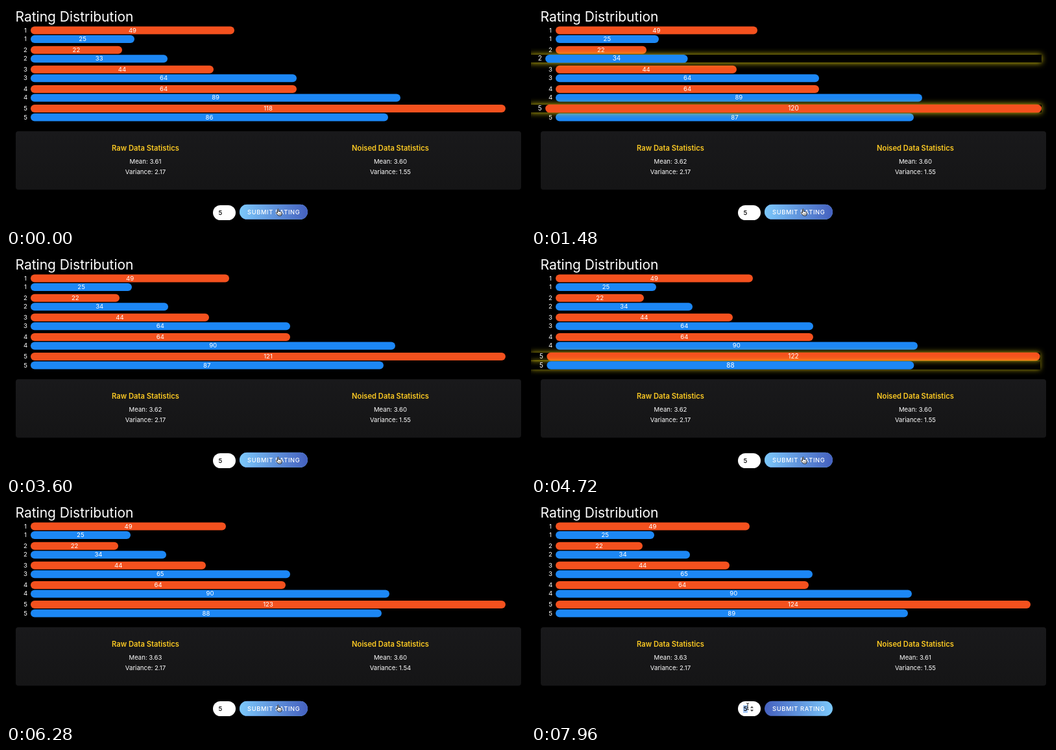
An HTML page that plays this animation: 800 by 339 pixels, repeating every 8000 ms.

```html
<!DOCTYPE html>
<html lang="en">
<head>
<meta charset="utf-8">
<title>Rating Distribution</title>
<style>
  html, body { margin: 0; width: 100%; height: 100%; overflow: hidden; background: #000; }
  body { position: relative; color: #fff; font: 9.6px/12px Inter, "Noto Sans", sans-serif; }
  body * { position: absolute; box-sizing: border-box; white-space: nowrap; }
  h1 { left: 14.5px; top: 3px; margin: 0; font-size: 21px; font-weight: 400; line-height: 27px; }
  .row { left: 14px; top: 0; width: 756px; height: 12px; }
  .row span { left: 10px; width: 12px; text-align: center; }
  .bar { left: 24px; height: 12px; border-radius: 6px; text-align: center; }
  .raw { background: #f4511e; }
  .noised { background: #1c87f5; }
  #panel { left: 14.5px; top: 193px; width: 779px; height: 90px; border-radius: 4px;
           background: linear-gradient(#19191b, #151516); }
  .stats { top: 0; width: 200px; text-align: center; }
  .stats * { width: 100%; left: 0; }
  .stats b { top: 19.5px; color: #fdca23; font-size: 11.2px; font-weight: 600; }
  .mean { top: 40.5px; }
  .variance { top: 57px; }
  #field { left: 319px; top: 307px; width: 35px; height: 23px; border-radius: 12px; background: #fff; color: #000; font-weight: 500; }
  #digit { left: 8px; top: 5.5px; padding: 0 .5px; }
  #button { left: 360px; top: 307px; width: 105px; height: 23px; border-radius: 12px; overflow: hidden;
            background: linear-gradient(90deg, #4561bf, #7cc8fb); }
  #hover { inset: 0; background: linear-gradient(90deg, #7cc8fb, #4561bf); }
  #caption { left: 12px; top: 5.5px; font-size: 9.3px; font-weight: 500; letter-spacing: .65px; }
  svg { left: 0; top: 0; overflow: visible; }
</style>
</head>
<body>
<h1>Rating Distribution</h1>
<div id="chart"></div>
<div id="panel">
  <div class="stats" style="left:100.5px"><b>Raw Data Statistics</b><div class="mean"></div><div class="variance"></div></div>
  <div class="stats" style="left:478px"><b>Noised Data Statistics</b><div class="mean"></div><div class="variance"></div></div>
</div>
<div id="field">
  <span id="digit">5</span>
  <svg id="spinner" width="1" height="1"><path d="M19 10.6l2.5-3 2.5 3zM19 13l2.5 3 2.5-3z" fill="#444"/></svg>
</div>
<div id="button"><div id="hover"></div><span id="caption">SUBMIT RATING</span></div>
<svg id="hand" width="1" height="1">
  <path d="M-2.4-4.6Q-1.6-5.8-.8-4.6V-1.2Q.2-2 1-.9Q2-1.5 2.6-.4Q3.9-.8 4 .6V2.6Q3.8 3.8 3.1 5H-1.2L-4.6 1.2Q-4.9-.2-3.6 0L-2.4 1Z"
        fill="#fff" stroke="#111" stroke-width=".9"/>
  <path d="M-.4 1.6V3.6M1 1.6V3.6M2.4 1.6V3.6" stroke="#111" stroke-width=".6"/>
</svg>
<svg id="beam" width="1" height="1">
  <path d="M-2-5Q0-5 0-3.8Q0-5 2-5M0-3.8V3.8M-2 5Q0 5 0 3.8Q0 5 2 5M-1 1.5H1" fill="none" stroke="#222"/>
</svg>

<script>
const LOOP = 8000, FULL_WIDTH = 756, BAR_LIMIT = 732;
const WIDTH_TIME = 400, PRESS_LEAD = 200, PRESS_TIME = 120;
const LEAVE = 7450, ARRIVE = 7720, SELECT = 7820;

// Every submission adds a raw 5 and one randomly shifted rating.
const submissions = [[220, 5], [1380, 2], [3020, 4], [4340, 5], [5380, 3], [6380, 5]]
  .map(([time, noised]) => ({ time, noised }));
const states = [{ raw: [49, 22, 44, 64, 118], noised: [25, 33, 64, 89, 86] }];
for (const { noised } of submissions) {
  const last = states.at(-1);
  const add = (counts, rating) => counts.map((n, i) => n + (i === rating - 1));
  states.push({ raw: add(last.raw, 5), noised: add(last.noised, noised) });
}

const $ = id => document.getElementById(id);
const clamp = x => Math.min(1, Math.max(0, x));
const mix = (a, b, p) => a + (b - a) * p;
const smooth = x => { x = clamp(x); return x * x * (3 - 2 * x); };
const easeOut = x => 1 - (1 - clamp(x)) ** 3;
const pulse = age => easeOut(age / 190) * (1 - smooth((age - 300) / 260));

const rows = [];
for (let i = 0; i < 5; i++) {
  ['raw', 'noised'].forEach((kind, k) => {
    const row = document.createElement('div');
    row.className = 'row';
    row.innerHTML = `<span>${i + 1}</span><div class="bar ${kind}"></div>`;
    $('chart').append(row);
    rows.push({ row, bar: row.lastChild, kind, i, y: 31.6 + 30.1 * i + 13.5 * k });
  });
}

const barWidth = (state, kind, i) =>
  Math.min(BAR_LIMIT, FULL_WIDTH * state[kind][i] / Math.max(...state.raw, ...state.noised));

function showStats(element, counts) {
  const total = counts.reduce((sum, n) => sum + n, 0);
  const mean = counts.reduce((sum, n, i) => sum + n * (i + 1), 0) / total;
  const variance = counts.reduce((sum, n, i) => sum + n * (i + 1 - mean) ** 2, 0) / total;
  element.querySelector('.mean').textContent = 'Mean: ' + mean.toFixed(2);
  element.querySelector('.variance').textContent = 'Variance: ' + variance.toFixed(2);
}

function drawChart(t) {
  const step = submissions.filter(s => s.time <= t).length;
  const state = states[step], before = states[Math.max(0, step - 1)];
  const current = submissions[step - 1];
  const age = current ? t - current.time : Infinity;
  const growth = smooth(age / WIDTH_TIME);
  const glow = current ? pulse(age) : 0;

  for (const { row, bar, kind, i, y } of rows) {
    bar.style.width = mix(barWidth(before, kind, i), barWidth(state, kind, i), growth) + 'px';
    bar.textContent = state[kind][i];
    const lit = glow > 0 && i + 1 === (kind === 'raw' ? 5 : current.noised);
    row.style.transform = `translateY(${y}px) scale(${lit ? 1 + .05 * glow : 1})`;
    row.style.zIndex = lit ? 1 : 'auto';
    row.style.boxShadow = lit ? `0 0 ${10 * glow}px rgba(255,235,20,${.95 * glow})` : 'none';
  }
  const [raw, noised] = document.querySelectorAll('.stats');
  showStats(raw, state.raw);
  showStats(noised, state.noised);
}

function drawControls(t) {
  const pressed = submissions.some(s => {
    const held = t - s.time + PRESS_LEAD;
    return held >= 0 && held < PRESS_TIME;
  });
  const move = smooth((t - LEAVE) / (ARRIVE - LEAVE));
  const x = mix(421, 334, move), y = mix(318, 315, move);
  const hovering = x > 360, inField = x < 354;
  $('button').style.transform = `translateY(${hovering && !pressed ? -1.2 : -.2}px)`;
  $('hover').style.opacity = hovering ? 1 : 0;
  $('hand').style.display = inField ? 'none' : '';
  $('beam').style.display = inField ? '' : 'none';
  $('spinner').style.display = inField ? '' : 'none';
  $('digit').style.background = t >= SELECT ? '#a9cbf8' : 'none';
  for (const id of ['hand', 'beam']) $(id).style.transform = `translate(${x}px, ${y}px)`;
}

function frame() {
  const t = performance.now() % LOOP;
  drawChart(t);
  drawControls(t);
  requestAnimationFrame(frame);
}
frame();
</script>
</body>
</html>
```
